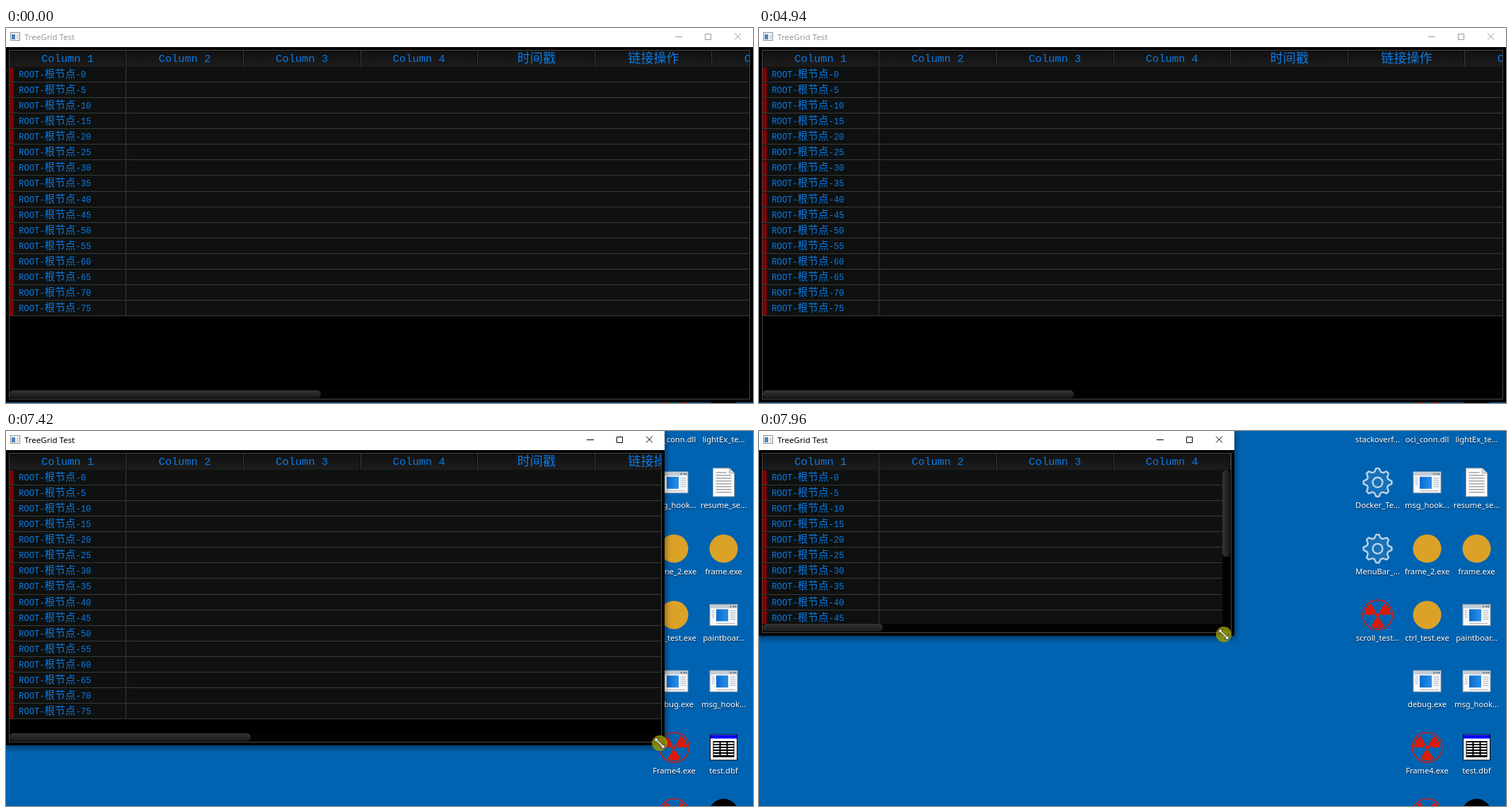
Write an HTML page that moves like this. It is 1056 by 531 pixels and loops after 8000 ms.

```html
<!DOCTYPE html>
<html lang="zh">
<head>
<meta charset="utf-8">
<title>TreeGrid Test</title>
<style>
html, body { margin: 0; width: 100%; height: 100%; overflow: hidden; background: #0063b1; }
#stage { position: relative; width: 1056px; height: 531px; overflow: hidden; background: #0063b1; }
svg { position: absolute; left: 0; top: 0; display: block; }
#win { position: absolute; left: 0; top: 0; background: #000; box-shadow: 0 1px 4px rgba(0,0,0,.25); }
#win.active { box-shadow: 0 2px 9px 1px rgba(0,0,0,.5); }
#bar { position: absolute; left: 0; top: 0; right: 0; height: 27px; background: #fff; color: #999; }
.active #bar { color: #000; }
#bar span { position: absolute; left: 26px; top: 4px; font: 11.5px/18px "Noto Sans", "Open Sans", sans-serif; white-space: pre; }
#buttons { left: auto; right: 0; }
#grid { position: absolute; left: 4px; top: 31px; right: 4px; bottom: 4px; border: 1px solid #474747; overflow: hidden; }
.track { position: absolute; background: #030303; right: 0; bottom: 0; }
#across { left: 0; height: 12px; }
#down { top: 23px; width: 12px; }
.thumb { position: absolute; left: 0; top: 0; border-radius: 6px; }
#across .thumb { height: 11px; background: linear-gradient(#343434, #191919); }
#down .thumb { width: 11px; background: linear-gradient(90deg, #343434, #191919); }
#grid text { fill: #0a7be6; font-family: "Liberation Mono", "Noto Sans CJK SC", monospace; }
#grid .han { font-family: "Noto Sans CJK SC", "Noto Sans CJK", sans-serif; }
#labels text { font: 11.2px "Noto Sans", "Open Sans", sans-serif; fill: #fff; text-anchor: middle; text-shadow: 0 1px 2px rgba(0,0,0,.7); }
</style>
</head>
<body>
<div id="stage">
  <svg id="desktop" width="1056" height="531">
    <defs>
      <linearGradient id="pane"><stop stop-color="#0a6cd0"/><stop offset="1" stop-color="#2a8fe8"/></linearGradient>
      <g id="app">
        <rect x="-19.5" y="-15" width="39" height="30" fill="#fafafa" stroke="#8b97a3"/>
        <path d="M-19-12h38" stroke="#c3ccd4" stroke-width="5"/>
        <path d="M9-12h2m2 0h2m1 0h2" stroke="#5a6570" stroke-width="2"/>
        <rect x="-10.500" y="-8" width="17" height="17" fill="url(#pane)"/>
        <path d="M9-6h8M9-3h8M9 0h8M9 3h8M9 6h8M-17-6h4M-17-3h4M-17 0h4M-17 3h4M-10 12h26" stroke="#a5adb5"/>
      </g>
      <g id="doc">
        <path d="M-15-20h23l7 7v33h-30z" fill="#fbfbfb" stroke="#a9a9a9"/>
        <path d="M8-20v7h7" fill="#ddd" stroke="#a9a9a9"/>
        <path d="M-11-14h15M-11-10h22M-11-6h22M-11-2h22M-11 2h22M-11 6h22M-11 10h22M-11 14h22" stroke="#a3a7aa" stroke-width="1.5"/>
      </g>
      <g id="gear" fill="none" stroke="#b9d2e6" stroke-width="2.4" stroke-linejoin="round">
        <path id="teeth" fill="rgba(185,210,230,.12)"/><circle r="7"/>
      </g>
      <g id="rad" fill="none" stroke="#d81c0c">
        <circle r="21" stroke-width="1.6"/>
        <circle r="11.5" stroke-width="14" pathLength="6" stroke-dasharray="1 1" transform="rotate(60)"/>
        <circle r="3" fill="#d81c0c" stroke="none"/>
      </g>
      <g id="table">
        <rect x="-19" y="-18" width="38" height="36" fill="#fff" stroke="#000"/>
        <rect x="-18.500" y="-17.500" width="37" height="5" fill="#00f"/>
        <rect x="-15" y="-9" width="30" height="23" fill="#000"/>
        <path d="M-14-6h28M-14-2h28M-14 2h28M-14 6h28M-14 10h28" stroke="#fff" stroke-width="2" stroke-dasharray="8 2"/>
      </g>
      <circle id="gold" r="20" fill="#dca227"/>
      <circle id="black" r="21" fill="#000"/>
    </defs>
    <rect id="hover" x="911" y="514" width="68" height="70" fill="#fff" opacity=".2"/>
    <g id="icons"></g>
    <g id="labels"></g>
  </svg>

  <div id="win">
    <div id="bar">
      <svg width="24" height="27">
        <rect x="6.500" y="6.500" width="13" height="11" fill="#f7f8f9" stroke="#87919b"/>
        <rect x="8" y="9" width="5" height="7" fill="#4d84b5"/>
        <path d="M15 10.500h3M15 12.500h3M15 14.500h3" stroke="#aab2ba"/>
      </svg>
      <span>TreeGrid Test</span>
      <svg id="buttons" width="120" height="27" fill="none" stroke="currentColor">
        <path d="M10 12.500h10M52.500 8.500h8v8h-8zM94 7.500l9 9M103 7.500l-9 9"/>
      </svg>
    </div>
    <div id="grid">
      <svg id="cells" width="2500" height="380" viewBox="5 32 2500 380">
        <defs>
          <linearGradient id="head" x2="0" y2="1"><stop stop-color="#101010"/><stop offset="1" stop-color="#1d1d1d"/></linearGradient>
        </defs>
        <rect x="5" y="32" width="2500" height="23" fill="url(#head)"/>
        <rect x="5" y="55" width="2500" height="353" fill="#0e1110"/>
        <g id="rows"></g>
      </svg>
      <div id="across" class="track"><div class="thumb"></div></div>
      <div id="down" class="track"><div class="thumb"></div></div>
    </div>
  </div>

  <svg width="1056" height="531">
    <g id="pointer">
      <circle id="press" r="11" fill="rgba(160,160,0,.8)"/>
      <path id="arrow" d="M0 0v15l3.500-3.300 2.400 5.600 2.500-1-2.400-5.500h4.800z" fill="#fff" stroke="#000" stroke-width=".8"/>
      <path id="resize" d="M-7-7h6l-2.200 2.200 8 8L7 1v6H1l2.200-2.200-8-8L-7-1z" fill="#fff" stroke="#222" stroke-width=".8"/>
    </g>
  </svg>
</div>

<script>
const $ = id => document.getElementById(id);
const LOOP = 8000, ACTIVATE = 6960, DRAG = 7110, STEP = 77.2;
const COL = 165.6, ROW = 353 / 16, CONTENT = 2485;

function buildDesktop() {
  const columns = [
    [874.5, "stackoverf...", "Docker_Te...|gear", "MenuBar_...|gear", "scroll_test...|rad"],
    [944.5, "oci_conn.dll", "msg_hook...|app", "frame_2.exe|gold", "ctrl_test.exe|gold", "debug.exe|app", "Frame4.exe|rad", "|rad"],
    [1014.5, "lightEx_te...", "resume_se...|doc", "frame.exe|gold", "paintboar...|app", "msg_hook...|app", "test.dbf|table", "|black"]
  ];
  let icons = "", labels = "";
  for (const [x, ...items] of columns) items.forEach((item, i) => {
    const [name, icon] = item.split("|"), y = i * 93.8;
    if (icon) icons += `<use href="#${icon}" x="${x}" y="${y - 21}"/>`;
    labels += `<text x="${x}" y="${y + 15.5}">${name}</text>`;
  });
  $("icons").innerHTML = icons;
  $("labels").innerHTML = labels;

  const points = [];
  for (let i = 0; i < 32; i++) {
    const a = (i - 0.5) * Math.PI / 16, r = i % 4 < 2 ? 20 : 15.5;
    points.push((r * Math.cos(a)).toFixed(1) + " " + (r * Math.sin(a)).toFixed(1));
  }
  $("teeth").setAttribute("d", "M" + points.join("L") + "Z");
}

function buildGrid() {
  const box = (x, y, w, h, fill) =>
    `<rect x="${x}" y="${y}" width="${w}" height="${h}" fill="${fill}"/>`;
  let out = "";
  for (let i = 0; i < 15; i++) {
    const right = Math.round(169.3 + i * COL), mid = 87 + i * COL;
    const han = { 4: "时间戳", 5: "链接操作" }[i];
    out += box(right - 1, 32, 1, 23, "#080808") + box(right, 32, 1, 23, "#3b3b3b");
    out += han
      ? `<text class="han" x="${mid + 0.5}" y="49" font-size="18.1" text-anchor="middle">${han}</text>`
      : `<text x="${mid}" y="48" font-size="15.4" text-anchor="middle">Column ${i + 1}</text>`;
  }
  for (let i = 0; i < 16; i++) {
    const top = Math.round(55 + i * ROW), end = Math.round(55 + (i + 1) * ROW);
    out += box(5, end - 1, 2500, 1, "#383b3a") + box(5, top + 1, 6, end - top - 2, "#7e0003");
    out += `<text x="18" y="${(70 + i * ROW).toFixed(1)}" font-size="12.2">ROOT-<tspan class="han" font-size="14.6">根节点</tspan>-${i * 5}</text>`;
  }
  $("rows").innerHTML = out + box(169, 55, 1, 353, "#383b3a");
}

// window right, window bottom, pointer x, pointer y
const drag = [
  [1056, 530, 1047, 527], [1045, 522, 1036, 519], [1000, 494, 990, 490], [957, 464, 950, 462],
  [931, 445, 924, 442], [906, 424, 897, 420], [879, 400, 868, 394], [846, 375, 830, 368],
  [812, 349, 798, 342], [750, 322, 736, 318], [697, 298, 682, 296], [672, 290, 657, 288]
];

// start time, pointer shape, x, y
const hovering = [
  [1840, "arrow", 1050, 531], [1990, "arrow", 1049, 530], [2220, "resize", 1050, 531],
  [2390, "resize", 1050, 530], [2450, "resize", 1054, 531], [2770, "arrow", 1053, 529],
  [2910, "resize", 1055, 531], [3000, "", 0, 0], [3310, "arrow", 1052, 530],
  [3460, "resize", 1052, 531], [3540, "", 0, 0], [4310, "resize", 1050, 530],
  [4860, "resize", 1048, 530], [4940, "", 0, 0], [5940, "arrow", 1049, 530],
  [6570, "resize", 1050, 531]
];

function pointerAt(t) {
  if (t < 760) return ["", 0, 0];
  if (t < 1840) {
    const p = Math.min(8, Math.floor((t - 760) / 77.5)) / 8;
    return ["arrow", 965 + 85 * Math.sin(p * Math.PI / 2), 529 - 23 * Math.sin(p * Math.PI)];
  }
  return hovering.filter(h => h[0] <= t).pop().slice(1);
}

function show(id, on) { $(id).style.display = on ? "" : "none"; }

function draw(t) {
  const n = Math.min(11, Math.floor((t - DRAG) / STEP)), moving = n >= 0;
  const [w, h, px, py] = drag[Math.max(0, n)];
  const [shape, x, y] = moving ? ["resize", px, py] : pointerAt(t);
  const viewH = h - 72, tall = viewH < 353, viewW = w - 10 - (tall ? 12 : 0);

  $("win").className = t >= ACTIVATE ? "active" : "";
  $("win").style.width = w + "px";
  $("win").style.height = h + "px";
  $("across").firstChild.style.width = viewW * viewW / CONTENT + "px";
  $("down").firstChild.style.height = 123 + (viewH - 218) * 1.44 + "px";
  show("down", tall);
  show("hover", t >= 610 && t < 760);
  show("press", t >= ACTIVATE);
  show("arrow", shape === "arrow");
  show("resize", shape === "resize");
  $("pointer").setAttribute("transform", `translate(${x} ${y})`);
}

buildDesktop();
buildGrid();
const start = performance.now();
function tick() {
  draw((performance.now() - start) % LOOP);
  requestAnimationFrame(tick);
}
tick();
</script>
</body>
</html>
```
